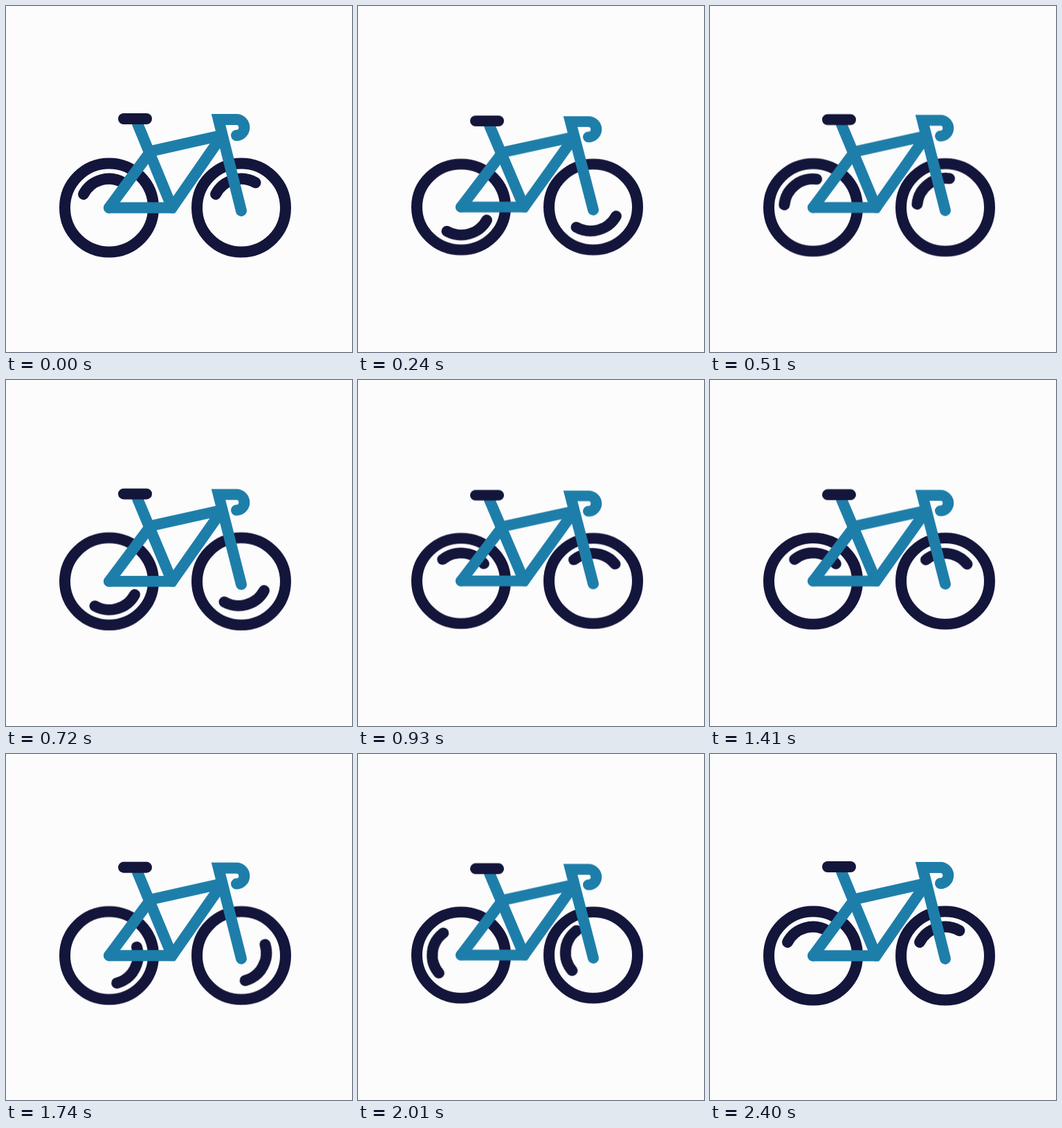
Animation of 500x500 px, one loop 2.43 s. Source, as an HTML page:

```html
<!DOCTYPE html>
<html lang="en">
<head>
<meta charset="utf-8">
<title>Bicycle</title>
<style>
  html, body { margin: 0; width: 100%; height: 100%; overflow: hidden; background: #fcfcfc; }
  svg { display: block; width: 100%; height: 100%; }
  path, circle { fill: none; stroke-width: 16; stroke-linecap: round; }
  .dark { stroke: #14153b; }
  .blue { stroke: #1e7eaa; }

  .bike { transform-origin: 250px 259px; animation: squash 2430ms steps(10) infinite; }
  .spin { animation: spin 2430ms steps(81) infinite; }
  .rear { transform-origin: 149px 291.5px; }
  .front { transform-origin: 338px 288.5px; }

  /* 81 ticks of 30 ms, one sixteenth of a turn each */
  @keyframes spin { to { transform: rotate(-1822.5deg); } }

  /* four bounces of 20 ticks, then one tick of rest */
  @keyframes squash {
    0%, 24.6914%, 49.3827%, 74.0741%, 98.7654%, 100% { transform: scaleY(1); }
    12.3457%, 37.037%, 61.7284%, 86.4198% { transform: scaleY(.96); }
  }
</style>
</head>
<body>
<svg viewBox="0 0 500 500">
  <g class="bike">
    <g class="dark">
      <circle cx="149" cy="291.5" r="64"/>
      <circle cx="340" cy="291.5" r="64"/>
      <path class="spin rear" d="M112 272A41.7 41.7 0 0 1 169.5 255.2"/>
      <path class="spin front" d="M303 272A41.7 41.7 0 0 1 360.5 255.2"/>
    </g>
    <g class="blue">
      <path d="M190 170L240 291.5"/>
      <path d="M149 291.5L209 210L311 187"/>
      <path d="M149 291.5H240L311 189"/>
      <path d="M340 296L307 164H333A11.3 11.5 0 0 1 333 187"/>
    </g>
    <path class="dark" d="M170 163H203"/>
  </g>
</svg>
</body>
</html>
```
